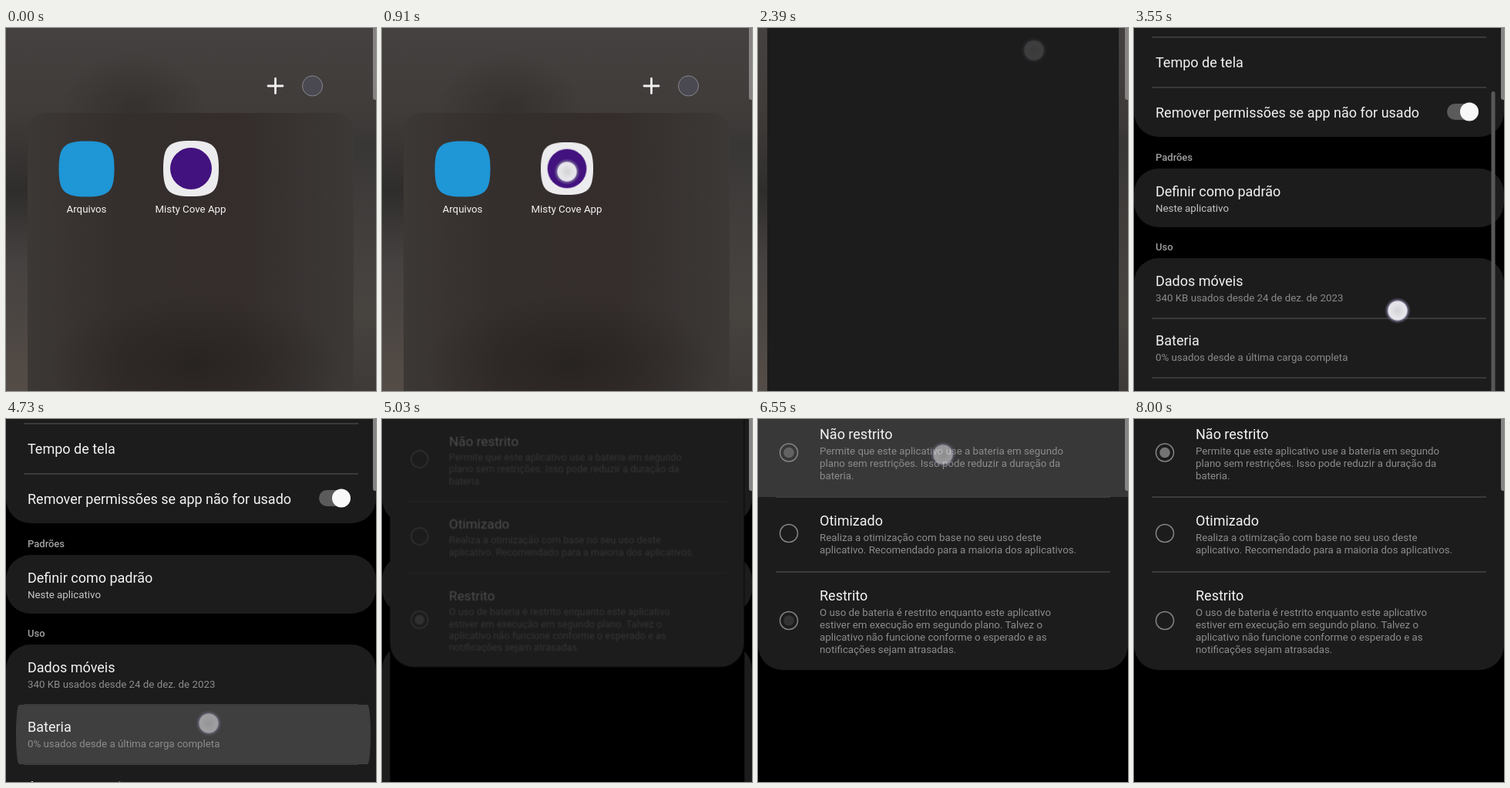
An HTML page that plays this animation: 480x470 px, repeating every 8.55 s.

```html
<!DOCTYPE html>
<html lang="pt-BR">
<head>
<meta charset="utf-8">
<title>Ajuste de bateria do app</title>
<style>
html, body { margin: 0; width: 100%; height: 100%; overflow: hidden; background: #000; }
svg { display: block; width: 480px; height: 470px; font-family: Roboto, "Noto Sans", sans-serif; }
text { fill: #f4f4f4; font-size: 18px; }
.sub text, text.sub { fill: #8c8c8c; font-size: 13.3px; }
text.on { fill: #c6c6c6; }
text.head { fill: #a2a2a2; font-size: 13px; font-weight: 500; }
.mid text, text.mid { text-anchor: middle; }
.small text, text.small { font-size: 13.3px; }
.card { fill: #1c1c1c; }
.lines { stroke: #3b3b3b; stroke-width: 2; }
.icon { fill: none; stroke: #f2f2f2; stroke-width: 1.6; stroke-linecap: round; stroke-linejoin: round; }
.radio circle { fill: none; stroke: #858585; stroke-width: 1.5; }
.pick { fill: #747474; }

/* one loop lasts 8550 ms */
.a { animation: 8.55s linear infinite both; }

.press { animation-name: press; transform-origin: 240px 182px; }
@keyframes press {
  0%, 8.54% { transform: none; }
  10.5%, 14.6% { transform: scale(.94); }
  17.4%, 100% { transform: translateY(4.5px); }
}
.label { animation-name: label; }
@keyframes label { 0%, 14.6% { opacity: 1; } 16.4%, 100% { opacity: 0; } }
.popup { animation-name: popup; transform-origin: 240px 132px; }
@keyframes popup {
  0%, 14.6% { opacity: 0; transform: scale(.6); animation-timing-function: ease-out; }
  17.6%, 100% { opacity: 1; transform: none; }
}

.window { animation-name: window; transform-origin: 240px 235px; }
@keyframes window {
  0%, 25.8% { opacity: 0; transform: scale(.8); }
  27% { opacity: 1; transform: scale(.89); }
  27.95% { opacity: 1; transform: scale(.95); animation-timing-function: ease-out; }
  28.65%, 100% { opacity: 1; transform: none; }
}
.page { animation-name: page; }
@keyframes page { 0%, 29.47% { opacity: 0; } 31.6%, 100% { opacity: 1; } }
.scroll { animation-name: scroll; }
@keyframes scroll {
  0%, 36.14% { transform: none; animation-timing-function: cubic-bezier(.4, 0, .4, 1); }
  41.52% { transform: translateY(-270px); animation-timing-function: ease-out; }
  43.5%, 100% { transform: translateY(-276px); }
}
.bar { animation-name: bar; }
@keyframes bar {
  0%, 36.14% { opacity: 0; transform: translateY(-62px); animation-timing-function: cubic-bezier(.4, 0, .4, 1); }
  36.8% { opacity: 1; }
  41.52% { transform: none; }
  43.6% { opacity: 1; transform: translateY(1px); }
  46.08%, 100% { opacity: 0; transform: translateY(1px); }
}
.hold { animation-name: hold; }
@keyframes hold { 0%, 51.6% { opacity: 0; } 54%, 56.4% { opacity: .16; } 59%, 100% { opacity: 0; } }

.battery { animation-name: battery; transform-origin: 240px 235px; }
@keyframes battery {
  0%, 56.6% { opacity: 0; transform: scale(.82); animation-timing-function: ease-out; }
  58.4% { opacity: 1; transform: scale(.94); animation-timing-function: ease-out; }
  60.94%, 100% { opacity: 1; transform: none; }
}
.options { animation-name: options; }
@keyframes options { 0%, 58% { opacity: 0; } 61.29% { opacity: .92; } 62.69%, 100% { opacity: 1; } }
.tap { animation-name: tap; }
@keyframes tap { 0%, 73.2% { opacity: 0; } 74.8%, 76.2% { opacity: .14; } 79.3%, 100% { opacity: 0; } }
.was { animation-name: was; }
@keyframes was { 0%, 75.6% { opacity: 1; } 77%, 100% { opacity: 0; } }
.now { animation-name: now; }
@keyframes now { 0%, 75.6% { opacity: 0; } 77%, 100% { opacity: 1; } }

/* touch points */
.t1 { animation-name: t1; }
@keyframes t1 { 0%, 8.54% { opacity: 0; } 9.3%, 16.6% { opacity: 1; } 18.48%, 100% { opacity: 0; } }
.t2 { animation-name: t2; }
@keyframes t2 { 0%, 23.2% { opacity: 0; } 24%, 25.6% { opacity: 1; } 27.95% { opacity: .17; } 28.65%, 100% { opacity: 0; } }
.t3 { animation-name: t3; }
@keyframes t3 {
  0%, 36.13% { opacity: 0; transform: translate(322px, 636px); }
  36.14% { opacity: 1; transform: translate(322px, 636px); animation-timing-function: cubic-bezier(.4, 0, .4, 1); }
  41.52% { opacity: 1; transform: translate(342px, 366px); }
  42% { opacity: 1; transform: translate(342px, 362px); }
  44.2%, 100% { opacity: 0; transform: translate(342px, 360px); }
}
.t4 { animation-name: t4; }
@keyframes t4 { 0%, 50.99% { opacity: 0; } 51.8%, 54.2% { opacity: 1; } 55.32% { opacity: .58; } 56.8%, 100% { opacity: 0; } }
.t5 { animation-name: t5; }
@keyframes t5 { 0%, 72.98% { opacity: 0; } 73.8%, 75.5% { opacity: 1; } 78%, 100% { opacity: 0; } }
</style>
</head>
<body>
<svg viewBox="0 0 480 470">
  <defs>
    <linearGradient id="wall" x2="0" y2="1">
      <stop offset="0" stop-color="#444140"/>
      <stop offset=".22" stop-color="#403c3a"/>
      <stop offset=".45" stop-color="#2f2d2c"/>
      <stop offset=".64" stop-color="#454140"/>
      <stop offset="1" stop-color="#544c46"/>
    </linearGradient>
    <linearGradient id="side" x2="0" y2="1">
      <stop offset="0" stop-color="#403c3a"/>
      <stop offset=".12" stop-color="#393736"/>
      <stop offset=".55" stop-color="#45413f"/>
      <stop offset=".72" stop-color="#47433f"/>
      <stop offset="1" stop-color="#3d3a38"/>
    </linearGradient>
    <linearGradient id="folder">
      <stop offset="0" stop-color="#3c3835"/>
      <stop offset=".3" stop-color="#342e2c"/>
      <stop offset=".65" stop-color="#342d2c"/>
      <stop offset="1" stop-color="#3c3937"/>
    </linearGradient>
    <radialGradient id="shade">
      <stop offset="0" stop-color="#262220" stop-opacity=".85"/>
      <stop offset="1" stop-color="#262220" stop-opacity="0"/>
    </radialGradient>
    <radialGradient id="touch">
      <stop offset="0" stop-color="#d2d2d4"/>
      <stop offset=".6" stop-color="#e8e7ec"/>
      <stop offset=".72" stop-color="#dedbe6"/>
      <stop offset=".78" stop-color="#8d84a4" stop-opacity=".7"/>
      <stop offset="1" stop-color="#6e6585" stop-opacity="0"/>
    </radialGradient>
    <circle id="dot" r="17" fill="url(#touch)"/>
    <path id="tile" d="M-36 0C-36-29-29-36 0-36S36-29 36 0 29 36 0 36-36 29-36 0z"/>
  </defs>

  <!-- folder on the home screen -->
  <rect width="480" height="470" fill="url(#wall)"/>
  <ellipse cx="165" cy="105" rx="95" ry="75" fill="url(#shade)" opacity=".5"/>
  <rect x="440" y="105" width="40" height="365" fill="url(#side)"/>
  <path d="M349.500 65.500v19M340 75h19" stroke="#f0f0f0" stroke-width="2.8" stroke-linecap="round"/>
  <circle cx="397.500" cy="75" r="13" fill="#4a4850" stroke="#89878b"/>
  <rect x="28" y="110" width="423" height="400" rx="24" fill="url(#folder)"/>
  <ellipse cx="245" cy="435" rx="190" ry="90" fill="url(#shade)"/>
  <use href="#tile" x="104.500" y="182.500" fill="#1f96d6"/>
  <g class="mid small">
    <text x="104.500" y="239">Arquivos</text>
    <text class="a label" x="239.500" y="239">Misty Cove App</text>
  </g>
  <g class="a press">
    <use href="#tile" x="240" y="182" fill="#ecebed"/>
    <circle cx="240" cy="182" r="27" fill="#42127f"/>
  </g>

  <g class="a popup">
    <path d="M235 128h11l-5.500 5z" fill="#1f1d1c"/>
    <rect x="90" y="-9" width="303" height="138" rx="17" fill="#1f1d1c"/>
    <path d="M90 56V8a17 17 0 0 1 17-17h269a17 17 0 0 1 17 17v48z" fill="#282625"/>
    <text class="mid" x="238.500" y="32.500" style="font-size:18.4px;font-weight:500">Misty Cove App</text>
    <g class="icon">
      <circle cx="360" cy="27" r="8"/>
      <path d="M360 26.500v4.500M360 23.200v.1"/>
      <circle cx="144" cy="81" r="9"/>
      <path d="M140 81l3 3 5-5.500"/>
      <path d="M233 78.500l8.500-7 8.500 7v9q0 2.500-2.500 2.500h-12q-2.500 0-2.500-2.500zM241.500 79v7M238 82.500h7"/>
      <path d="M331.500 73.500l15 15M346.500 73.500l-15 15"/>
    </g>
    <g class="mid small">
      <text x="144" y="111">Selecionar</text>
      <text x="242.500" y="111">Ad. à Tela inic…</text>
      <text x="339.500" y="111">Desinstalar</text>
    </g>
  </g>

  <!-- app details -->
  <rect class="a window card" y="-150" width="480" height="770"/>
  <g class="a page">
    <rect width="480" height="470"/>
    <g class="a scroll"><g transform="translate(0 270)">
      <g class="card">
        <rect y="-420" width="480" height="240" rx="32"/>
        <rect y="-142" width="480" height="283" rx="32"/>
        <rect y="182" width="480" height="76" rx="32"/>
        <rect y="298" width="480" height="290" rx="32"/>
      </g>
      <rect class="a hold" x="13" y="376" width="460" height="77" rx="4" ry="38" fill="#fff"/>
      <path class="lines" d="M23-65h434M23 12h434M23 77h434M23 376h434M23 453h434"/>
      <text class="mid" x="240" y="-230">Misty Cove App</text>
      <text class="sub mid" x="240" y="-208">Instalado</text>
      <text class="head" x="28" y="-153">Privacidade</text>
      <text x="28" y="-107">Notificações</text>
      <text class="sub on" x="28" y="-87">Permitido</text>
      <text x="28" y="-30">Permissões</text>
      <text class="sub" x="28" y="-10">Nenhuma permissão solicitada</text>
      <text x="28" y="50.500">Tempo de tela</text>
      <text x="28" y="115.500">Remover permissões se app não for usado</text>
      <rect x="406" y="98" width="40" height="21" rx="10.500" fill="#5b5b5b"/>
      <circle cx="435" cy="108.500" r="12" fill="#f8f8f8"/>
      <text class="head" x="28" y="171.500">Padrões</text>
      <text x="28" y="217.500">Definir como padrão</text>
      <text class="sub on" x="28" y="237.500">Neste aplicativo</text>
      <text class="head" x="28" y="288">Uso</text>
      <text x="28" y="334">Dados móveis</text>
      <text class="sub" x="28" y="354">340 KB usados desde 24 de dez. de 2023</text>
      <text x="28" y="411">Bateria</text>
      <text class="sub" x="28" y="431">0% usados desde a última carga completa</text>
      <text x="28" y="488">Armazenamento</text>
    </g></g>
    <rect class="a bar" x="463.500" y="82" width="5" height="460" rx="2.500" fill="#585858"/>
  </g>

  <!-- battery options -->
  <g class="a battery">
    <rect y="-150" width="480" height="770"/>
    <rect class="card" y="-150" width="480" height="475" rx="32"/>
    <rect class="a tap" y="-20" width="480" height="121" fill="#fff"/>
    <g class="a options">
      <path class="lines" d="M23 101h434M23 198h434"/>
      <g class="radio">
        <circle cx="40" cy="43.500" r="11.500"/>
        <circle cx="40" cy="148" r="11.500"/>
        <circle cx="40" cy="261" r="11.500"/>
      </g>
      <circle class="a pick now" cx="40" cy="43.500" r="6.800"/>
      <circle class="a pick was" cx="40" cy="261" r="6.800"/>
      <text x="80" y="26">Não restrito</text>
      <text x="80" y="138">Otimizado</text>
      <text x="80" y="235">Restrito</text>
      <g class="sub">
        <text x="80" y="45.500">Permite que este aplicativo use a bateria em segundo</text>
        <text x="80" y="61.500">plano sem restrições. Isso pode reduzir a duração da</text>
        <text x="80" y="77.500">bateria.</text>
        <text x="80" y="158">Realiza a otimização com base no seu uso deste</text>
        <text x="80" y="174">aplicativo. Recomendado para a maioria dos aplicativos.</text>
        <text x="80" y="255">O uso de bateria é restrito enquanto este aplicativo</text>
        <text x="80" y="271">estiver em execução em segundo plano. Talvez o</text>
        <text x="80" y="287">aplicativo não funcione conforme o esperado e as</text>
        <text x="80" y="303">notificações sejam atrasadas.</text>
      </g>
    </g>
  </g>

  <use class="a t1" href="#dot" x="240" y="186"/>
  <use class="a t2" href="#dot" x="358" y="29"/>
  <use class="a t3" href="#dot"/>
  <use class="a t4" href="#dot" x="263" y="394"/>
  <use class="a t5" href="#dot" x="240" y="46"/>
  <rect x="476" y="-6" width="8" height="99" rx="3" fill="#858483"/>
</svg>
</body>
</html>
```
